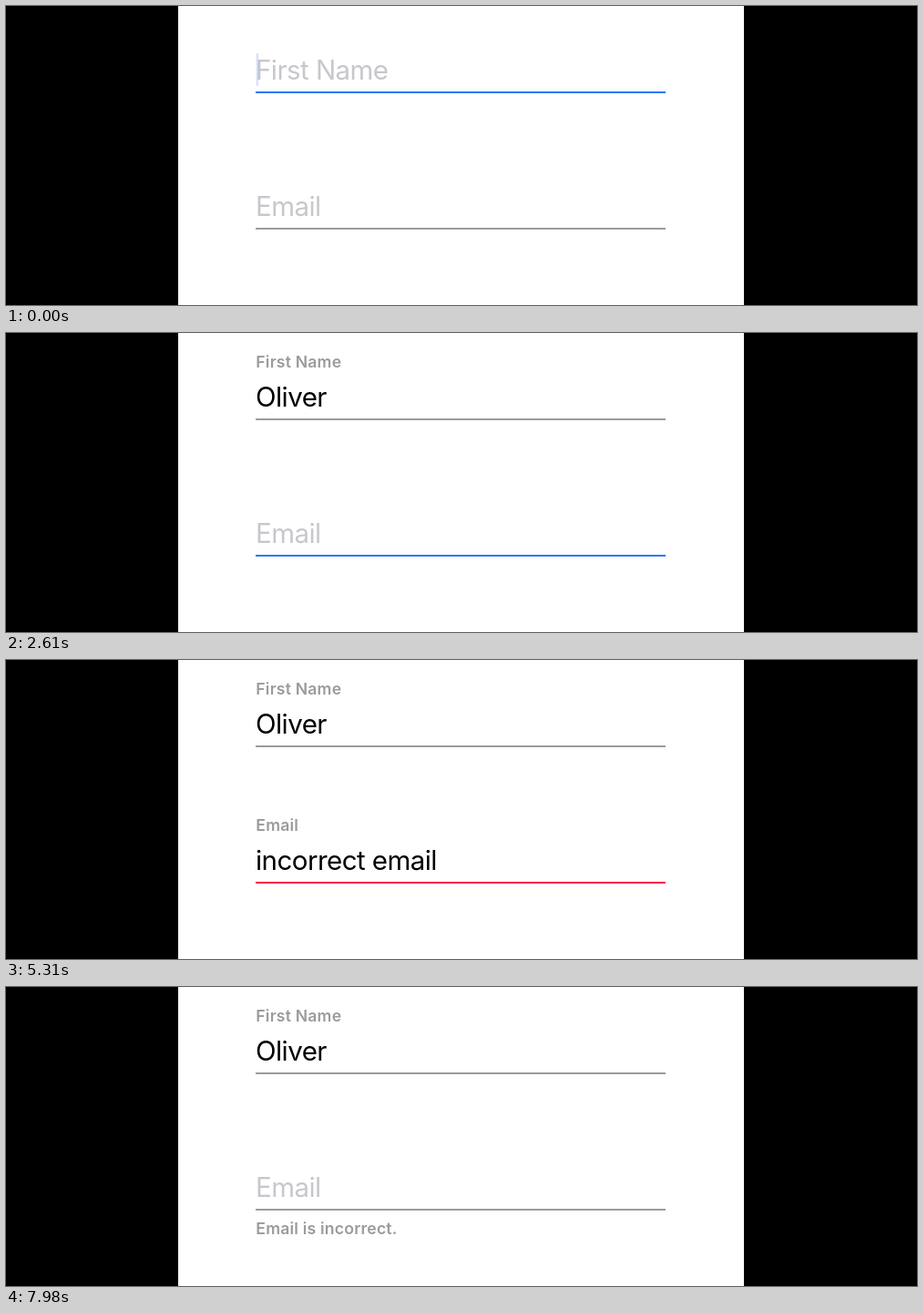
An HTML page that plays this animation: 1000x329 px, repeating every 8000 ms.

```html
<!DOCTYPE html>
<html lang="en">
<head>
<meta charset="utf-8">
<title>Form fields</title>
<style>
  html, body { margin: 0; width: 100%; height: 100%; overflow: hidden; background: #000; }
  svg { display: block; width: 100%; height: 100%; }
  text { font-family: Inter, Roboto, sans-serif; font-optical-sizing: none; white-space: pre; }
  .large { font-size: 29.5px; letter-spacing: -0.55px; }
  .small { font-size: 17.6px; font-weight: 600; letter-spacing: 0.2px; }
  .placeholder { fill: #c7c7cc; }
  .caret { fill: #426bf2; }
  .cross { stroke: #fff; stroke-width: 2.2; stroke-linecap: round; }
</style>
</head>
<body>
<svg id="stage" viewBox="0 0 1000 329">
  <rect x="189" width="621" height="329" fill="#fff"/>
</svg>
<script>
const LOOP = 8000, STEP = 30;
const GREY = [155, 155, 155], BLUE = [45, 120, 245], RED = [250, 32, 78];
const CLEAR = '#c8c8ca', PRESSED = '#0b74de';
const stage = document.getElementById('stage');

function add(parent, tag, attrs, text = '') {
  const node = document.createElementNS('http://www.w3.org/2000/svg', tag);
  for (const key in attrs) node.setAttribute(key, attrs[key]);
  node.textContent = text;
  return parent.appendChild(node);
}

function set(node, attrs) {
  for (const key in attrs) node.setAttribute(key, attrs[key]);
}

function makeField(y, title) {
  const g = add(stage, 'g', { transform: `translate(0 ${y})` });
  const field = {
    placeholder: add(g, 'text', { class: 'large placeholder', x: 274, y: 81 }, title),
    label: add(g, 'text', { class: 'small', x: 274.3, y: 38 }, title),
    value: add(g, 'text', { class: 'large', x: 274, y: 81 }),
    line: add(g, 'rect', { x: 274, y: 94, width: 450, height: 2 }),
    error: add(g, 'text', { class: 'small', x: 274.3, y: 122 }, 'Email is incorrect.'),
    clear: add(g, 'g', { transform: 'translate(702.5 70.5)' }),
    caret: add(g, 'rect', { class: 'caret', y: 52, width: 2.5, height: 36, rx: 1 })
  };
  field.disc = add(field.clear, 'circle', { r: 10.6 });
  add(field.clear, 'path', { class: 'cross', d: 'M-4-4 4 4M4-4-4 4' });
  return field;
}

const rgb = c => `rgb(${c.map(Math.round)})`;
const mix = (a, b, k) => a.map((v, i) => v + (b[i] - v) * k);

// Progress whose first visible step falls on `from` and last on `to`.
const fade = (t, from, to) => Math.min(1, Math.max(0, (t - from + STEP) / (to - from + STEP)));
const easeOut = k => 1 - (1 - k) * (1 - k);

function typed(text, times, t) {
  return text.slice(0, times.filter(at => t >= at).length);
}

function drawField(f, s) {
  if (f.value.textContent !== s.text) f.value.textContent = s.text;
  const end = s.text ? f.value.getComputedTextLength() : 0;
  const label = easeOut(s.label);
  set(f.placeholder, { opacity: s.text ? 0 : 1 });
  set(f.label, { opacity: label, y: 38 + 14 * (1 - label), fill: rgb(s.labelColor) });
  set(f.line, { fill: rgb(s.lineColor) });
  set(f.error, { opacity: s.error || 0, fill: rgb(s.lineColor) });
  set(f.clear, { opacity: s.text && s.focus ? 1 : 0 });
  set(f.disc, { fill: s.pressed ? PRESSED : CLEAR });
  set(f.caret, { x: Math.max(274.6, 273 + end), opacity: s.caret });
}

const nameKeys = [1890, 1980, 2070, 2130, 2220, 2280];
const emailKeys = [3330, 3510, 3630, 3750, 3930, 4080, 4140, 4320, 4410, 4530,
  4680, 4800, 4890, 4950, 5040];

function nameCaret(t) {
  if (t < 60) return 0.2;
  if (t < 1650) return fade(t, 330, 420) - fade(t, 840, 1110);
  return t < 2610 ? fade(t, 1650, 1740) : 0;
}

function emailCaret(t) {
  if (t < 2640) return 0;
  if (t < 3330) return 1 - fade(t, 3180, 3300);
  if (t < 5310) return 1;
  if (t < 6600) return 0;
  if (t < 7380) return 1 - fade(t, 7110, 7260);
  return 1 - fade(t, 7890, 7980);
}

function emailLine(t) {
  if (t < 2610) return GREY;
  if (t < 5310) return BLUE;
  return mix(RED, GREY, fade(t, 7890, 7980));
}

const nameField = makeField(0, 'First Name');
const emailField = makeField(150, 'Email');

function render(t) {
  const nameFocus = t < 2610;
  const emailFocus = t >= 2610 && t < 5310 || t >= 6600 && t < 7890;
  drawField(nameField, {
    text: typed('Oliver', nameKeys, t),
    focus: nameFocus,
    label: fade(t, 1950, 2130),
    labelColor: nameFocus ? BLUE : GREY,
    lineColor: nameFocus ? BLUE : GREY,
    caret: nameCaret(t)
  });
  drawField(emailField, {
    text: t < 7380 ? typed('incorrect email', emailKeys, t) : '',
    focus: emailFocus,
    label: fade(t, 3390, 3570) - fade(t, 7380, 7590),
    labelColor: emailFocus ? BLUE : GREY,
    lineColor: emailLine(t),
    error: fade(t, 5340, 5550),
    pressed: t >= 7290 && t < 7380,
    caret: emailCaret(t)
  });
}

const start = performance.now();
function tick() {
  const t = (performance.now() - start) % LOOP;
  render(Math.floor(t / STEP) * STEP);
  requestAnimationFrame(tick);
}
tick();
</script>
</body>
</html>
```
